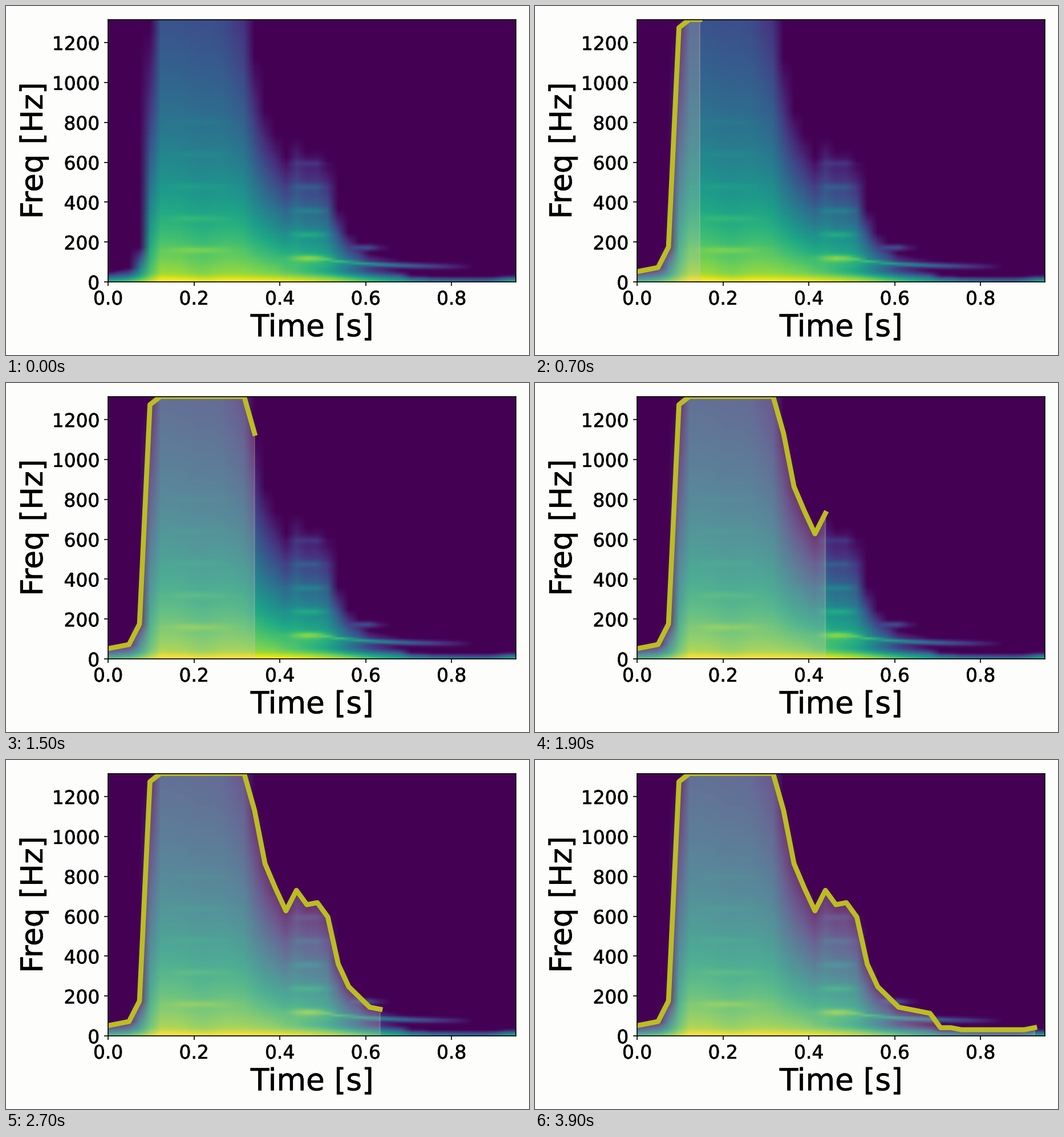
Recreate the animation shown at these times as a matplotlib script. Size 917x611 px, loop 4000 ms.

```python
import matplotlib.pyplot as plt
import numpy as np
from matplotlib import patheffects
from matplotlib.animation import FuncAnimation

W, H, DPI = 917, 611, 152.8
PAPER = "#fdfdfc"
OLIVE = "#bcbd22"
VEIL = (0.88, 0.79, 0.73)

STEPS, BINS = 40, 128
DT, DF = 0.02437, 10.28
F_MAX = BINS * DF

col = np.arange(STEPS)
times = col * DT
freqs = np.arange(BINS + 1)[:, None] * DF

# Corners of the bandwidth curve: time step, frequency bin
CORNERS = [(0, 5), (2, 7), (3, 17), (4, 124), (5, BINS), (13, BINS),
           (14, 110), (15, 84), (17, 61), (18, 71), (19, 64), (20, 65),
           (21, 58), (22, 35), (23, 24), (25, 14), (28, 11), (29, 4),
           (30, 4), (31, 3), (37, 3), (38, 4)]
edge = np.round(np.interp(col, *zip(*CORNERS))) * DF


def hump(x, center, width):
    return np.exp(-((x - center) / width) ** 2)


def ramp(start, end):
    """Rises from 0 to 1 between two time steps."""
    return np.clip((col - start) / (end - start), 0, 1)


def rolloff(f):
    """Level against frequency of the loudest part."""
    return .12 + .78 * np.exp(-f / 750)


def spectrogram():
    attack = .6 + .4 * ramp(0, 5) ** 2
    decay = .22 + .78 / (1 + np.exp((col - 26) / 3.5))
    gain = attack * decay - .05 * hump(col, 9, 1.5) + .35 * ramp(36, 39)

    # Tilt each column so that it reaches zero at its edge
    tilt = np.where(edge < F_MAX, gain * rolloff(edge) / edge,
                    .12 * hump(col, 13.5, 2) / F_MAX)
    level = gain * rolloff(freqs) - tilt * freqs
    level += .15 * hump(freqs, 0, 25)
    level -= .22 * ramp(16, 28) * hump(freqs, 55, 25)

    # Two tones with harmonics
    for pitch, center, width, power in [(160, 8.7, 2.5, .09),
                                        (119, 19.3, 1.6, .21)]:
        for n in range(1, 6):
            ripple = power / n ** .5 * hump(col, center, width)
            level += ripple * hump(freqs, n * pitch, 16)

    # The second tone outlasts the rest as a thin falling tail
    pitch = 74 + 45 * np.exp((20 - col) / 5)
    tail = .84 * (1 - ramp(20, 35)) * (col >= 20)
    level = np.maximum(level, tail * hump(freqs, pitch, 12))
    echo = .28 * hump(col, 24.5, 1.3)
    level = np.maximum(level, echo * hump(freqs, 172, 14))
    return np.clip(level, 0, 1)


# A hair over the pixel size guards against rounding down
fig = plt.figure(figsize=((W + .01) / DPI, (H + .01) / DPI), dpi=DPI,
                 facecolor=PAPER)
left, right, top, bottom = 179, 894.4, 23.6, 483
ax = fig.add_axes([left / W, 1 - bottom / H,
                   (right - left) / W, (bottom - top) / H])
ax.pcolormesh(times, freqs[:, 0], spectrogram(), shading="gouraud",
              cmap="viridis", vmin=0, vmax=1)
ax.set_xlim(0, times[-1])
ax.set_ylim(0, F_MAX)
ax.set_xticks(np.arange(5) * .2)
ax.set_yticks(range(0, 1201, 200))
ax.tick_params(labelsize=15.5)
ax.tick_params(axis="x", pad=3)
ax.set_xlabel("Time [s]", fontsize=25, labelpad=3.5)
ax.set_ylabel("Freq [Hz]", fontsize=25, labelpad=2.8)

# Slightly heavier lettering
bold = [patheffects.withStroke(linewidth=.3, foreground="black")]
for text in [ax.xaxis.label, ax.yaxis.label,
             *ax.get_xticklabels(), *ax.get_yticklabels()]:
    text.set_path_effects(bold)

veil, = ax.fill([0, 0], [0, 0], color=VEIL, alpha=.25, lw=1, zorder=2)
trace, = ax.plot([], [], color=OLIVE, lw=4.1, zorder=2.5)


def draw(i):
    t, f = times[:i], edge[:i]
    trace.set_data(t, f)
    veil.set_visible(i > 0)
    if i:
        x = np.concatenate([[t[0]], t, [t[-1]]])
        y = np.concatenate([[0], f, [0]])
        veil.set_xy(np.column_stack([x, y]))
    return veil, trace


anim = FuncAnimation(fig, draw, frames=STEPS, interval=100, repeat=True,
                     repeat_delay=0, blit=False)
plt.show()
```
